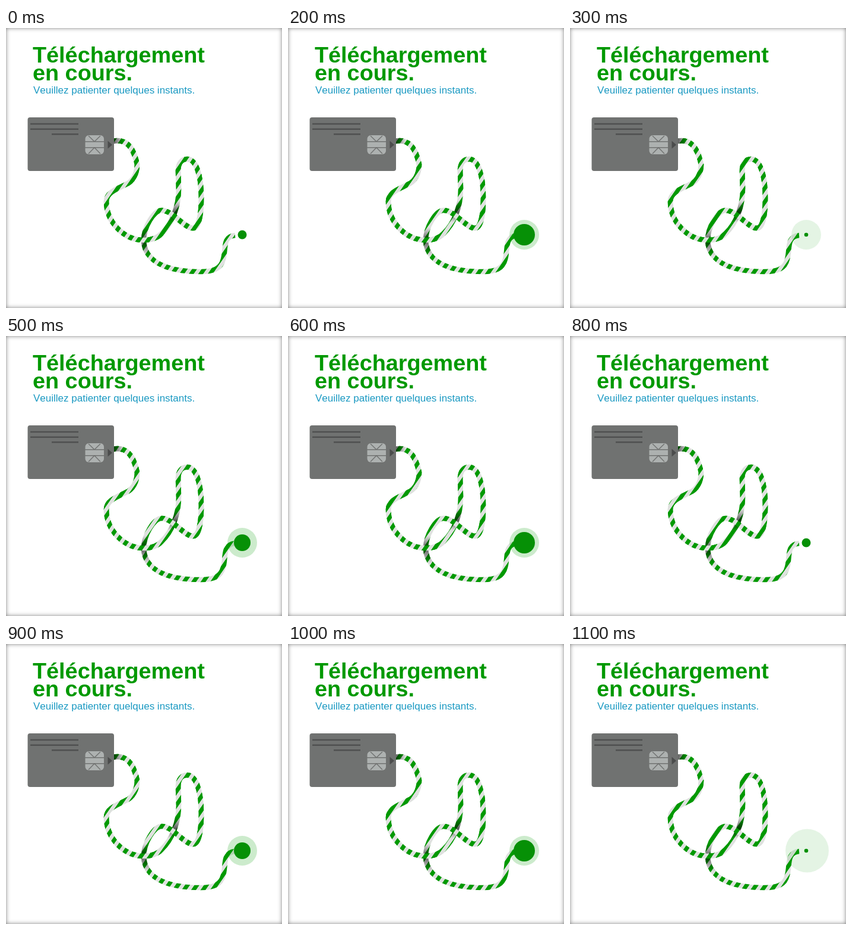
Animation, 465 px wide and 470 px high, one loop 1200 ms. Source, as an HTML page:

```html
<!DOCTYPE html>
<html lang="fr">
<head>
<meta charset="utf-8">
<title>Téléchargement en cours</title>
<style>
html, body { margin: 0; width: 100%; height: 100%; overflow: hidden; background: #fff; }
body::after { content: ""; position: fixed; inset: 0; box-shadow: inset 0 0 7px rgba(0, 0, 0, .5); }
svg { display: block; }
text { font-family: "Liberation Sans", Arial, sans-serif; font-kerning: none; }
.title { font-size: 37.8px; font-weight: bold; fill: #090; }
.sub { font-size: 17px; fill: #1a99c2; }
</style>
</head>
<body>
<svg width="465" height="470" viewBox="0 0 465 470">
  <defs>
    <linearGradient id="stripes" gradientUnits="userSpaceOnUse" spreadMethod="repeat" x1="192" y1="189" x2="202.78" y2="196.5">
      <stop offset="0" stop-color="#090"/><stop offset=".47" stop-color="#090"/>
      <stop offset=".52" stop-color="#dfe1df"/><stop offset=".95" stop-color="#dfe1df"/>
      <stop offset="1" stop-color="#090"/>
    </linearGradient>
    <linearGradient id="shadeStart" gradientUnits="userSpaceOnUse" x1="181" y1="0" x2="198" y2="0">
      <stop offset="0" stop-opacity=".6"/><stop offset="1" stop-opacity="0"/>
    </linearGradient>
    <linearGradient id="shadeUp" gradientUnits="userSpaceOnUse" x1="0" y1="290" x2="0" y2="326">
      <stop offset="0" stop-opacity="0"/><stop offset=".55" stop-opacity=".6"/><stop offset="1" stop-opacity="0"/>
    </linearGradient>
    <linearGradient id="shadeDown" gradientUnits="userSpaceOnUse" x1="0" y1="335" x2="0" y2="382">
      <stop offset="0" stop-opacity="0"/><stop offset=".45" stop-opacity=".6"/><stop offset="1" stop-opacity="0"/>
    </linearGradient>
  </defs>

  <text class="title" x="45" y="58">Téléchargement</text>
  <text class="title" x="45" y="88">en cours.</text>
  <text class="sub" x="46" y="110">Veuillez patienter quelques instants.</text>

  <g id="rope" fill="none" stroke-width="8.6"></g>

  <rect x="36.5" y="150" width="145.5" height="90" rx="4" fill="#707271"/>
  <path d="M41 161H122M41 169.7H122M77 178.2H122" stroke="#4f5050" stroke-width="2.4"/>
  <rect x="133.5" y="180" width="31.5" height="32" rx="6" fill="#adb1b0"/>
  <path d="M133 190.8H165M133 200.8H165M139 181L149 190.8L159 181M139 211L149 200.8L159 211" fill="none" stroke="#707271" stroke-width="1.4"/>
  <path d="M171.5 189.5L179 196L171.5 202.5Z" fill="#4b4c4c"/>

  <circle id="halo" cx="398" cy="347" fill="#090"/>
  <circle id="dot" cx="398" cy="347" fill="#069006"/>
</svg>
<script>
const get = id => document.getElementById(id);
const rope = get("rope"), stripes = get("stripes"), halo = get("halo"), dot = get("dot");

// Consecutive stretches of the rope, each starting where the last one ends.
const stub = "M181 190C187 188.5 193 189 198 191";
const first = stub + "C211 196 217 211 221 229C221 245 213 258 203 262C190 269 169 275 169 291C169 325 198 356 232 356C245 356 255 353 262 345";
const rising = "M262 345C280 328 291 300 291 270";
const loop = "M291 270L290 240C290 226 297 220 305 220C320 220 329 246 329 285C329 312 325 336 315 336C300 336 281 306 262 306";
const falling = "M262 306C249 306 232 335 232 356C232 380 250 394 270 401";
const last = "M270 401C287 407 310 409 328 409C350 409 362 404 366 388C371 372 364 350 386 348";
const whole = [first, rising, loop, falling, last].join("").replace(/(?!^)M/g, "L");

function strand(d, paint) {
  const path = document.createElementNS("http://www.w3.org/2000/svg", "path");
  path.setAttribute("d", d);
  path.setAttribute("stroke", `url(#${paint})`);
  rope.append(path);
}
strand(whole, "stripes");
strand(rising, "shadeUp");
strand(falling, "shadeDown");
// Strands that pass over the shaded ones
strand(first, "stripes");
strand(loop, "stripes");
strand(stub, "shadeStart");

const STEP = 100, STEPS = 12, PERIOD = 16;
const pulse = [
  { dot: 7.5, halo: 0, alpha: 0 },
  { dot: 14, halo: 25, alpha: .2 },
  { dot: 18, halo: 25, alpha: .2 },
  { dot: 3.3, halo: 36.5, alpha: .105 }
];

function draw(now) {
  const step = Math.floor(now / STEP) % STEPS;
  const beat = pulse[step % 4];
  // The halo spreads fully only from the second pulse on.
  const radius = step < 4 ? Math.min(beat.halo, 25) : beat.halo;
  stripes.setAttribute("gradientTransform", `translate(${step % 4 * PERIOD / 4} 0)`);
  dot.setAttribute("r", beat.dot);
  halo.setAttribute("r", radius);
  halo.setAttribute("cx", radius > 25 ? 399.5 : 398);
  halo.setAttribute("opacity", beat.alpha);
}

const start = performance.now();
function tick() {
  draw(performance.now() - start);
  requestAnimationFrame(tick);
}
tick();
</script>
</body>
</html>
```
